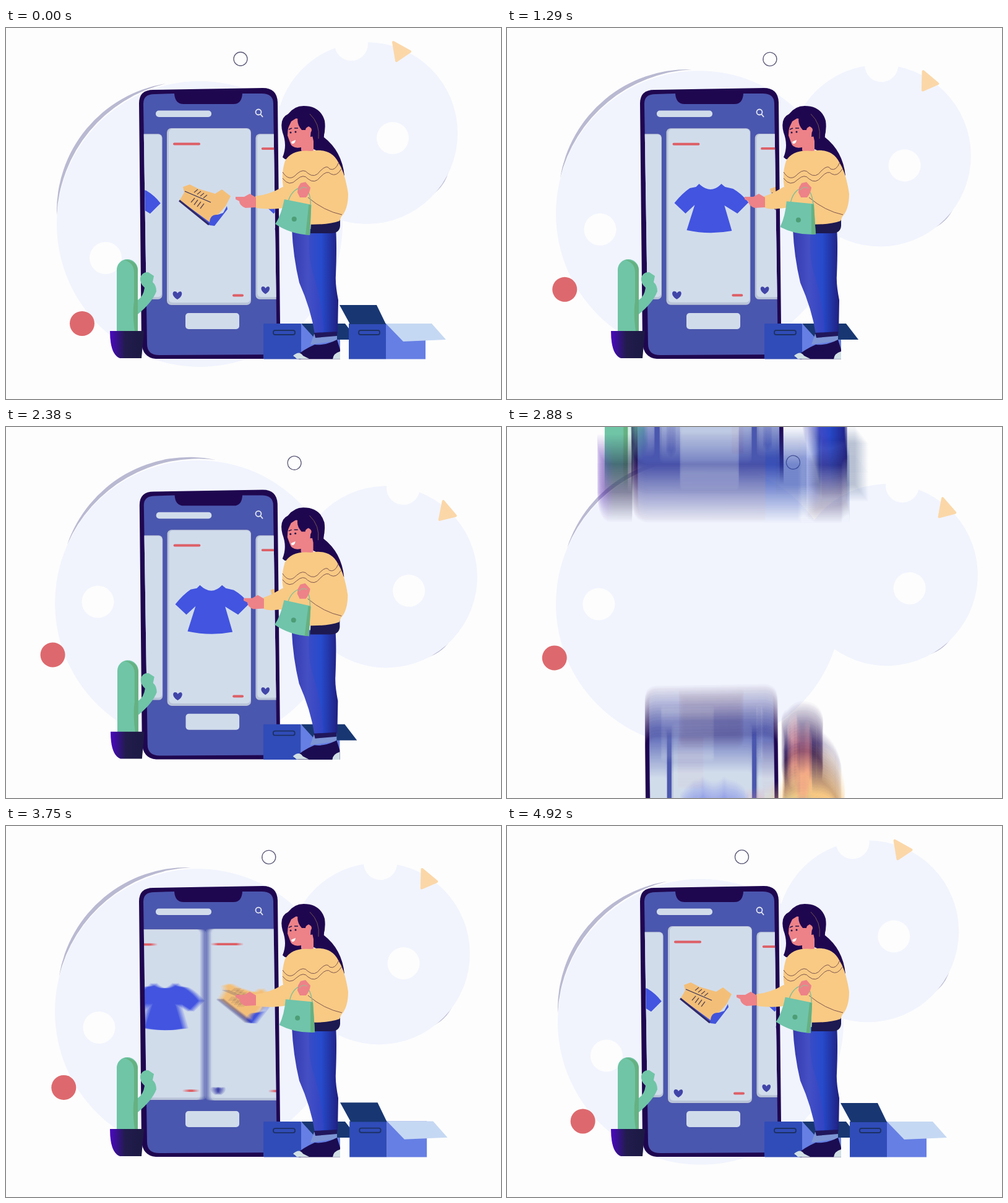
Animation, 800 px wide and 600 px high, one loop 4960 ms. Source, as an HTML page:

```html
<!DOCTYPE html>
<html lang="en">
<head>
<meta charset="utf-8">
<title>Shopping app</title>
<style>
  html, body { margin: 0; width: 100%; height: 100%; overflow: hidden; background: #fdfdfd; }
  svg { display: block; width: 100%; height: 100%; }
</style>
</head>
<body>
<svg viewBox="0 0 800 600">
  <defs>
    <linearGradient id="potFill"><stop stop-color="#4b08c4"/><stop offset=".45" stop-color="#211c4c"/><stop offset="1" stop-color="#1c1944"/></linearGradient>
    <linearGradient id="frontLeg"><stop stop-color="#363ab0"/><stop offset=".5" stop-color="#454fc4"/><stop offset="1" stop-color="#3044c4"/></linearGradient>
    <linearGradient id="backLeg"><stop stop-color="#404bc4"/><stop offset=".5" stop-color="#264bcc"/><stop offset="1" stop-color="#201f80"/></linearGradient>
    <path id="screen" d="M222 122Q222 107 240 107L272 106Q273 123 287 123H368Q381 123 382 106L413 106Q432 106 432 122L438 528L248 529Q228 529 228 511Z"/>
    <clipPath id="screenClip"><use href="#screen"/></clipPath>

    <g id="card">
      <rect x="-69" y="-143" width="138" height="288" rx="8" fill="#5551a0" opacity=".35"/>
      <rect x="-68" y="-142" width="136" height="286" rx="7" fill="#b9c4d8"/>
      <rect x="-65" y="-141" width="132" height="281" rx="6" fill="#d1dceb"/>
      <path d="M-56 -116.500H-16M40 128.500H54" stroke="#dd5f66" stroke-width="4" stroke-linecap="round"/>
      <path d="M-51 135C-60 130 -60 122 -55 122Q-52 122 -51 125Q-49 122 -46 122C-42 123 -43 131 -51 135Z" fill="#4145a8"/>
    </g>
    <g id="shoeCard">
      <use href="#card"/>
      <g transform="translate(-328 -304)">
        <path d="M281 278L288 266 286 257 297 253 311 260 338 268 349 261 363 272 355 288 329 317Z" fill="#f3bf78"/>
        <path d="M289 264L331 282" stroke="#33305f" stroke-width="1.300"/>
        <path d="M280 278L329 314Q330 301 342 302L351 299 357 288 358 293 337 320 329 319Z" fill="#4254dc"/>
        <path d="M280 279L328 318" stroke="#302967" stroke-width="3"/>
        <path d="M304 266l6 -5m-1 8l6 -5m-1 8l6 -5m-1 8l6 -5M299 282l6 -7m-1 11l6 -8m-1 11l6 -8m-1 11l6 -8" stroke="#624c55" stroke-width="1.400"/>
      </g>
    </g>
    <g id="shirtCard">
      <use href="#card"/>
      <path d="M-15 -52Q4 -34 21 -52L27 -47 40 -44Q54 -36 65 -22L47 -4 26 -17 38 24Q2 31 -35 23L-22 -18 -37 -4 -55 -21Q-42 -37 -30 -45L-20 -47Z" fill="#4254e0"/>
    </g>

    <g id="scene">
      <path d="M215 122Q215 100 238 100L415 97Q438 97 439 120L443 478V535H242Q220 533 219 508Z" fill="#1f0750"/>
      <use href="#screen" fill="#4a57ae"/>
      <rect x="242" y="133.500" width="90" height="10.500" rx="5" fill="#d1dceb"/>
      <g fill="none" stroke="#e4e8f0" stroke-width="1.800"><circle cx="408" cy="136" r="4.500"/><path d="M411 139l4 5"/></g>
      <g clip-path="url(#screenClip)"><g id="cards"></g></g>
      <rect x="290" y="461" width="87" height="26" rx="5" fill="#d1dceb"/>

      <path d="M179 492V391A17 17 0 0 1 213 391V440Q222 434 224 420Q216 413 217 404Q220 394 230 395L239 401 237 411Q243 416 243 426Q236 444 213 463V492Z" fill="#6fc5a6"/>
      <path d="M190 375Q208 379 207 398V442Q204 460 208 491H213V391Q211 375 190 375Z" fill="#66b182"/>
      <path d="M168 490H223L219 534H184Q168 528 168 490Z" fill="url(#potFill)"/>

      <path d="M477 480H540V535H477Z" fill="#667fe4"/>
      <path d="M477 478H548L568 504H500Z" fill="#183772"/>
      <path d="M477 478L500 503 497 514 477 520Z" fill="#667fe4"/>
      <rect x="416" y="478" width="61" height="57.500" rx="1" fill="#304cb8"/>
      <rect x="432" y="489" width="35" height="7" rx="3" fill="none" stroke="#1c3165" stroke-width="1.800"/>
      <g id="parcel">
        <path d="M554 478H614V535.500H554Z" fill="#304cb8"/>
        <path d="M614 478H678V535.500H614Z" fill="#667fe4"/>
        <path d="M539 448H599L614 479H556Z" fill="#183772"/>
        <path d="M614 478H688L711 504 642 507Z" fill="#c5d8f3"/>
        <rect x="570" y="489" width="34" height="7" rx="3" fill="none" stroke="#1c3165" stroke-width="1.800"/>
      </g>

      <path d="M482 325H533Q535 350 533 400Q532 415 537 440L536 494H505L486 400Z" fill="url(#backLeg)"/>
      <path d="M462 325H491Q487 370 497 400Q513 450 513 495H499Q493 455 474 412Q464 370 462 325Z" fill="url(#frontLeg)"/>
      <path d="M498 495L535 492V506L492 512Z" fill="#7d95d4"/>
      <path d="M498 493L535 491V498L500 501Z" fill="#20175c"/>
      <path d="M466 533Q480 520 499 512Q516 514 535 504L540 520V535.500H474Z" fill="#1b0c51"/>
      <path d="M464 530Q474 521 480 530L490 535H470ZM528 535.500Q529 526 540 523V535.500Z" fill="#d0dfe4"/>

      <path d="M447 209Q455 190 447 169Q441 146 456 139Q466 126 481 126Q508 126 515 150Q517 164 513 176Q543 199 547 239Q520 205 493 194L466 203Q455 218 447 209Z" fill="#1f0750"/>
      <path d="M462 146Q484 145 493 164L497 183V200Q486 208 477 198V193Q462 196 459 185L455 174Q455 157 462 146Z" fill="#ed8288"/>
      <path d="M472 144Q469 155 478 165H485Q489 154 493 164L492 176Q502 173 505 189L512 184Q518 164 509 147Q494 126 472 137Q454 141 455 164L461 151Z" fill="#1f0750"/>
      <circle cx="489" cy="165" r="5" fill="#ed8288"/>
      <path d="M491 139Q508 155 505 179" fill="none" stroke="#71564d" stroke-width="1"/>
      <path d="M457 164l5 -2m4 0l6 0" stroke="#2b164a" stroke-width="1.500"/>
      <g fill="#211147"><circle cx="460" cy="169" r="1.500"/><circle cx="468" cy="168" r="1.500"/></g>
      <path d="M461 184l7 -3q-1 7 -6 6Z" fill="#fff"/>

      <path d="M493 312L540 307V320Q539 332 525 332H492Z" fill="#1d1951"/>
      <path d="M451 215Q462 196 493 199Q525 193 537 217Q548 234 553 268Q553 293 542 305L539 312Q515 321 460 316L450 267Q443 239 451 215Z" fill="#f8ca84"/>
      <path id="arm" fill="#f8ca84"/>
      <path id="hand" d="M371 273Q379 273 385 273L394 268 404 274V290L387 291Q377 287 377 280L371 277Z" fill="#ed8288"/>
      <g fill="none" stroke="#805650" stroke-width="1">
        <path d="M447 233Q458 250 470 236Q481 226 488 235Q499 244 508 231Q519 220 523 228Q532 232 538 217"/>
        <path d="M447 243Q458 258 470 245Q481 235 488 244Q499 253 508 241Q519 229 525 236Q534 241 542 228"/>
        <path d="M488 274Q514 296 543 302"/>
      </g>
      <g id="bag">
        <path d="M457 284Q461 263 477 258Q492 257 494 286" fill="none" stroke="#8abd97" stroke-width="1.500"/>
        <path d="M451 279L495 285 496 334Q465 335 439 320Q448 304 451 279Z" fill="#70c4aa"/>
        <path d="M491 285L495 286 496 334H489Z" fill="#66b182"/>
        <circle cx="469" cy="310" r="4" fill="#4d9d76"/>
      </g>
      <path d="M472 258L476 251 484 249 492 258Q491 267 485 274H475L471 266Z" fill="#ed8288"/>
      <path d="M474 262Q479 255 487 259" fill="none" stroke="#9fba92" stroke-width="1.200"/>
    </g>
  </defs>

  <g id="backdrop">
    <path d="M82 303A209 209 0 0 1 258 90A231 231 0 0 0 82 303ZM717 223A68 68 0 0 1 690 269A147 147 0 0 0 717 223Z" fill="#b9b9d2"/>
    <g fill="#f1f4fd"><circle cx="313" cy="317" r="231"/><circle cx="583" cy="170" r="147"/></g>
    <g fill="#fdfdfd"><circle cx="161" cy="372" r="26"/><circle cx="558" cy="26" r="27"/><circle cx="625" cy="178" r="26"/></g>
    <path d="M626 23L653 38 631 53Z" fill="#fbd7a8" stroke="#fbd7a8" stroke-width="4" stroke-linejoin="round"/>
    <circle cx="123" cy="478" r="20" fill="#dd696e"/>
    <circle cx="379" cy="50" r="11" fill="#fdfdfd" stroke="#5b5978" stroke-width="1.300"/>
  </g>
  <use id="leaving" href="#scene"/>
  <use id="arriving" href="#scene"/>
</svg>
<script>
const LOOP = 4960, SLIDE = 800, SHUTTER = 22;
const $ = id => document.getElementById(id);
const set = (el, name, value) => el.setAttribute(name, value);
const progress = (t, from, to) => Math.min(1, Math.max(0, (t - from) / (to - from)));
const smooth = u => u * u * (3 - 2 * u);
const backIn = (u, pull) => u * u * ((pull + 1) * u - pull);
const backInOut = (u, pull) => u < .5 ? backIn(2 * u, pull) / 2 : 1 - backIn(2 - 2 * u, pull) / 2;

function add(parent, tag, attributes) {
  const el = document.createElementNS('http://www.w3.org/2000/svg', tag);
  for (const name in attributes) set(el, name, attributes[name]);
  return parent.appendChild(el);
}

// Motion blur: each stage averages the picture with a shifted copy, halving the shift.
function makeBlur(id, axis) {
  const filter = add(document.querySelector('defs'), 'filter', {
    id, filterUnits: 'userSpaceOnUse', x: 0, y: -200, width: 800, height: 1000, 'color-interpolation-filters': 'sRGB'
  });
  const centre = add(filter, 'feOffset', { in: 'SourceGraphic', result: 'mix' });
  const shifts = [1, 2, 3, 4, 5, 6].map(() => {
    const shift = add(filter, 'feOffset', { in: 'mix', result: 'copy' });
    add(filter, 'feComposite', { in: 'mix', in2: 'copy', operator: 'arithmetic', k2: .5, k3: .5, result: 'mix' });
    return shift;
  });
  return (el, length) => {
    if (length < 2) return el.removeAttribute('filter');
    set(centre, axis, -length / 2);
    shifts.forEach((shift, i) => set(shift, axis, length / 2 ** (i + 1)));
    set(el, 'filter', `url(#${id})`);
  };
}
const blurLeaving = makeBlur('blurLeaving', 'dy');
const blurArriving = makeBlur('blurArriving', 'dy');
const blurCards = makeBlur('blurCards', 'dx');

const cards = [-1, 0, 1, 2, 3].map(index => ({
  index, el: add($('cards'), 'use', { href: index % 2 ? '#shirtCard' : '#shoeCard' })
}));

// The scene dips, shoots up, then swings to rest.
function slideAt(t) {
  if (t < 2868) {
    const u = progress(t, 1950, 2868);
    return .5 * u ** 8 * (9 * u - 8);
  }
  const since = t - 2868;
  return 1 - .5 * Math.exp(-.009 * since) * Math.cos(Math.PI * since / 245);
}

const swipeAt = t => backInOut(progress(t, 750, 1400), 1) + backInOut(progress(t, 3395, 4095), 1);

const blurLength = (fn, t, distance) => Math.abs(fn(t + 4) - fn(t - 4)) / 8 * distance * SHUTTER;

function placeScene(el, y, scale, blur, length) {
  const visible = Math.abs(y) < 700;
  set(el, 'display', visible ? 'inline' : 'none');
  if (!visible) return;
  set(el, 'transform', `translate(400 ${300 + y}) scale(${scale}) translate(-400 -300)`);
  blur(el, length);
}

function render(t) {
  const turn = 10.4 * (1 - Math.cos(2 * Math.PI * t / 5040));
  set($('backdrop'), 'transform', `rotate(${turn} 400 293)`);

  const swipe = swipeAt(t);
  for (const { el, index } of cards) {
    const d = index - swipe;
    const scale = 1 - .065 * Math.min(1, Math.abs(d));
    set(el, 'transform', `translate(${328 + 139 * d} 304) scale(${scale})`);
  }
  blurCards($('cards'), blurLength(swipeAt, t, 139) * .7);

  const reach = 13 * (smooth(progress(t, 850, 1250)) - smooth(progress(t, 3450, 3750)));
  set($('hand'), 'transform', `translate(${reach} 0)`);
  set($('arm'), 'd', `M${403 + reach} 272Q425 270 447 257L480 270Q472 290 440 292Q425 294 ${404 + reach} 291Z`);

  const swing = .5 + 5 * Math.cos(2 * Math.PI * (t + 340) / 2480);
  set($('bag'), 'transform', `rotate(${swing} 482 260)`);

  const grow = 1 - smooth(progress(t, 600, 1000)) + backInOut(progress(t, 3330, 3850), .8);
  set($('parcel'), 'display', grow > .01 ? 'inline' : 'none');
  set($('parcel'), 'transform', `translate(416 535) scale(${Math.max(0, grow)}) translate(-416 -535)`);

  const slide = slideAt(t), rest = slide - 1;
  const length = blurLength(slideAt, t, SLIDE);
  const swell = .016 * Math.sin(Math.PI * progress(t, 2980, 3500));
  placeScene($('leaving'), -SLIDE * slide, 1 + slide * (slide < 0 ? 1 : .17), blurLeaving, length);
  placeScene($('arriving'), -SLIDE * rest, 1 + swell + .096 * Math.min(0, rest), blurArriving, length);
}

const start = performance.now();
function tick() {
  render((performance.now() - start) % LOOP);
  requestAnimationFrame(tick);
}
tick();
</script>
</body>
</html>
```
